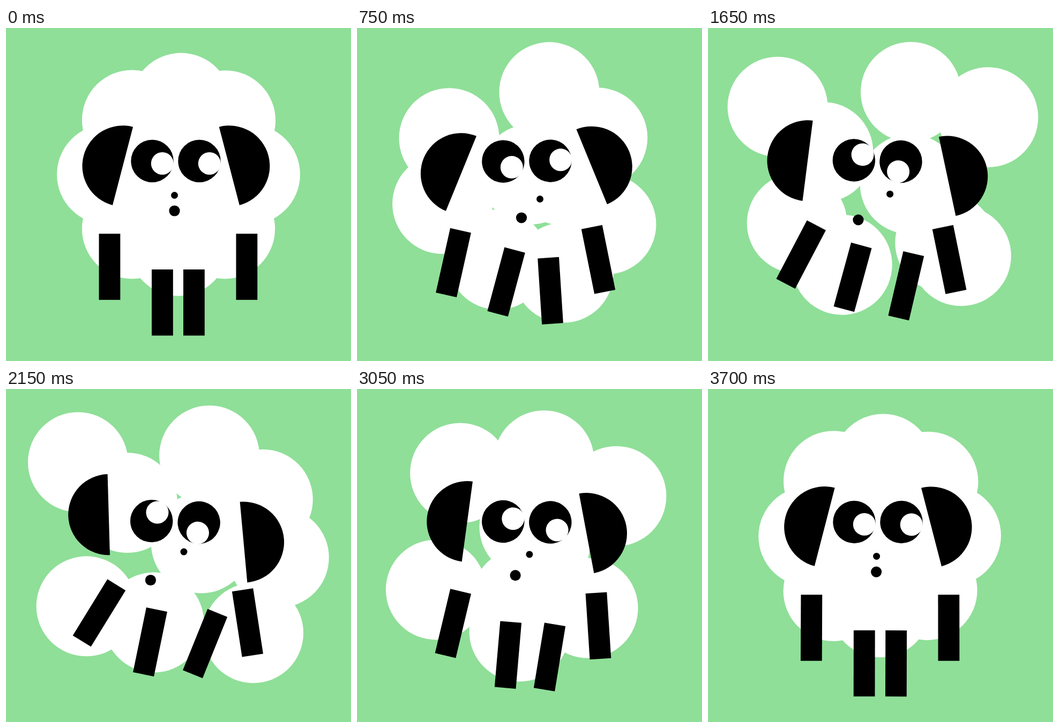
These frames come from a looping animation (644x622 px, 3750 ms). An HTML page:

```html
<!DOCTYPE html>
<html lang="en">
<head>
<meta charset="utf-8">
<title>Drifting sheep</title>
<style>
  html, body { margin: 0; width: 100%; height: 100%; overflow: hidden; background: #8fdf98; }
  svg { display: block; width: 644px; height: 622px; }
</style>
</head>
<body>
<svg id="stage" viewBox="0 0 644 622"></svg>
<script>
const LOOP = 3750, HOME = 3712, STEP = 50;
const OUT = 1000, FAR = 2030; // turning points shared by most parts
const CENTER = [322, 311];
const NS = 'http://www.w3.org/2000/svg';
const parts = [];

function add(parent, tag, attrs = {}) {
  const el = document.createElementNS(NS, tag);
  for (const k in attrs) el.setAttribute(k, attrs[k]);
  return parent.appendChild(el);
}

// A group that leaves home, turns at each key [time, dx, dy, angle] and returns.
function drift(keys, pivot = CENTER) {
  const el = add(document.getElementById('stage'), 'g');
  parts.push({ el, pivot, keys: [[0], ...keys, [HOME]] });
  return el;
}

function pose(keys, t) {
  let i = 1;
  while (i < keys.length - 1 && t > keys[i][0]) i++;
  const a = keys[i - 1], b = keys[i];
  const u = Math.min(1, (t - a[0]) / (b[0] - a[0]));
  return [1, 2, 3].map(c => (a[c] || 0) * (1 - u) + (b[c] || 0) * u);
}

// Fleece: puffs on a ring, placed by the angle from straight up.
function puff(degrees, keys, ring = 133.5) {
  const a = degrees * Math.PI / 180;
  const cx = 322 + ring * Math.sin(a), cy = 273.5 - ring * Math.cos(a);
  add(drift(keys), 'circle', { cx, cy, r: 93.5, fill: '#fff' });
}

function ear(side, out, far) {
  const g = drift([[OUT, ...out], [FAR, ...far]]);
  add(g, 'path', {
    d: `M0-75.6A75.6 75.6 0 0 ${side < 0 ? 0 : 1} 0 75.6Z`,
    transform: `translate(${317.4 + side * 99.4} 257.8) rotate(${-14.6 * side})`
  });
}

function eye(x, shift, keys) {
  const y = 248.5, g = drift(keys, [x, y]);
  add(g, 'circle', { cx: x + shift, cy: y, r: 39.7 });
  add(g, 'circle', { cx: x + shift + 18.8, cy: y + 4.5, r: 21, fill: '#fff' });
}

function leg(dx, top, out, far) {
  const g = drift([[OUT, ...out], [FAR, ...far]]);
  add(g, 'rect', { x: 321.4 + dx - 19.9, y: top, width: 39.8, height: 123.5 });
}

function dot(cy, r, out, far) {
  add(drift([[OUT, ...out], [FAR, ...far]]), 'circle', { cx: 314.5, cy, r });
}

puff(2, [[OUT, 43, -27], [FAR, 57, -17]]);
puff(41, [[700, 34, 35], [1550, 122, -14], [2170, 68, 35], [2600, 125, 46]]);
puff(90, [[750, -132, 0], [1200, -212, 31], [1750, -247, -58], [2150, -229, -61], [3050, -114, 16]]);
puff(139.5, [[OUT, 75, -11], [FAR, 57, 87]]);
puff(180, [[1200, -95, 41], [2150, -46, 29], [3050, -19, 46]]);
puff(-139.5, [[750, 150, 82], [1180, 145, 107], [2300, 294, -86], [3400, -31, 64]]);
puff(-90, [[750, -29, 55], [1250, -17, 33], [1850, -25, 120], [2700, -63, 155]]);
puff(-40.5, [[700, -61, 37], [1900, -117, -41]]);
puff(0, [[700, 60, 0], [1900, 54, 23], [3050, 0, -16]], 0);

ear(-1, [-42, 36.4, 10.1], [-16.7, -58.6, -17.5]);
ear(1, [39.2, 18.3, -10.3], [20.8, 13.1, 10.1]);

eye(271, 2, [[668, 0, 0, 27], [FAR, 0, 0, -75]]);
eye(360, 1, [[668, 0, 0, -29], [1755, 0, 0, 104]]);

leg(-128, 384.3, [17.3, 31.6, 16.8], [34.7, 64.2, 34]);
leg(-29.5, 451, [50.5, -31.7, 20], [18.4, -32.4, 12.5]);
leg(29.5, 451, [-3.6, -26.3, -4.9], [106, -36, 23.7]);
leg(128, 384.3, [-30.8, 18.9, -15.2], [-18.8, 12.1, -9.4]);

dot(312.5, 6.5, [36, 9.3], [18.8, -9.1]);
dot(341.5, 10.1, [-10, 17.3], [-48, 16.7]);

const start = performance.now();
function draw(now) {
  const t = Math.floor((Math.max(0, now - start) % LOOP) / STEP) * STEP;
  for (const { el, pivot, keys } of parts) {
    const [x, y, angle] = pose(keys, t);
    el.setAttribute('transform', `translate(${x} ${y}) rotate(${angle} ${pivot})`);
  }
  requestAnimationFrame(draw);
}
draw(start);
</script>
</body>
</html>
```
